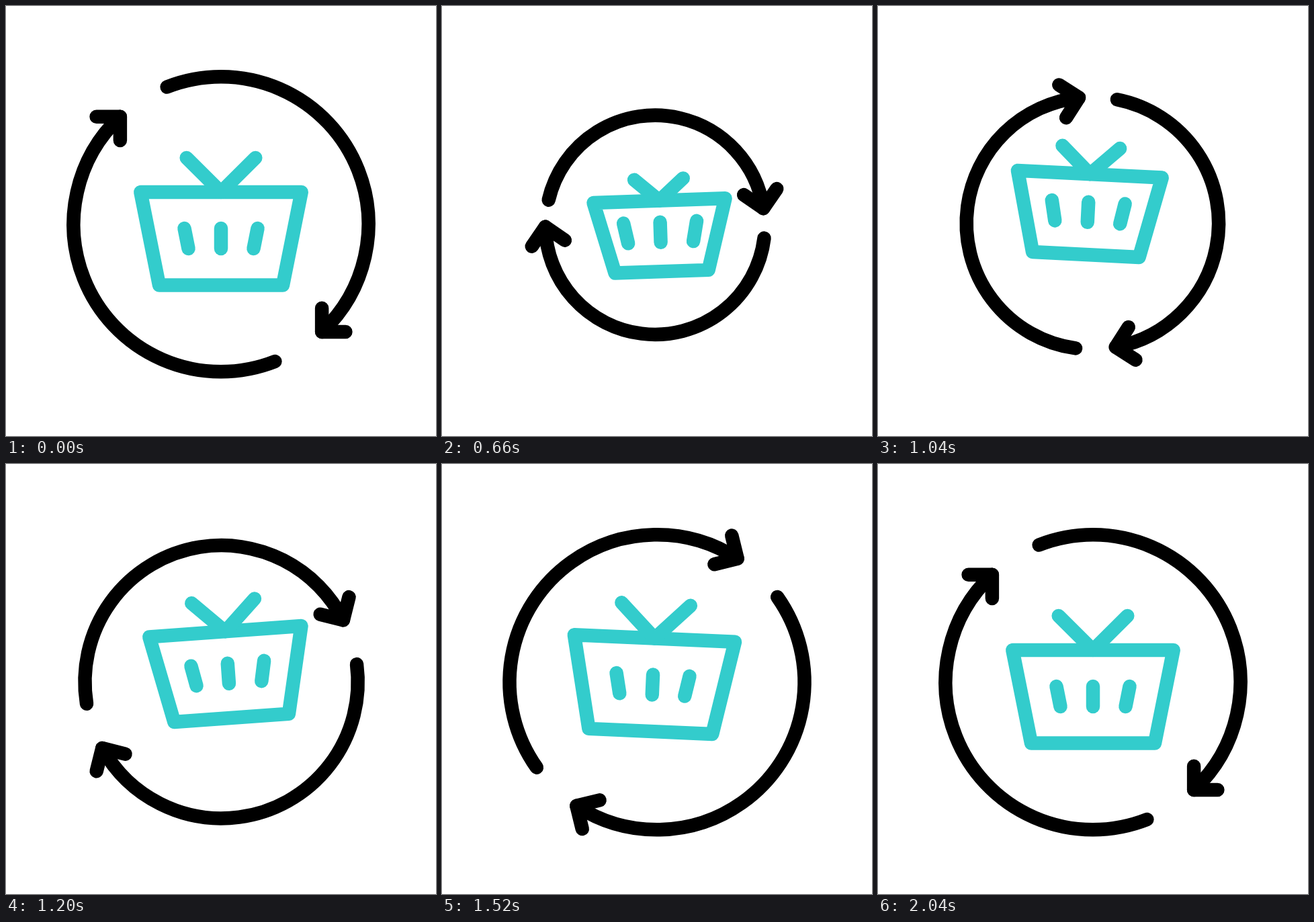
These frames come from a looping animation (640x640 px, 2.82 s). An HTML page with a canvas:

```html
<!DOCTYPE html>
<html lang="en">
<head>
<meta charset="utf-8">
<title>Basket cycle</title>
<style>
  html, body { margin: 0; width: 100%; height: 100%; overflow: hidden; background: #fff; }
  canvas { display: block; width: 100vmin; height: 100vmin; margin: 0 auto; }
</style>
</head>
<body>
<canvas id="stage"></canvas>
<script>
const LOOP = 2820, STEP = 20, SIZE = 640;
const RAD = Math.PI / 180;
const canvas = document.getElementById('stage');
const ctx = canvas.getContext('2d');
const scale = window.devicePixelRatio || 1;
canvas.width = canvas.height = SIZE * scale;

const mix = (a, b, k) => a + (b - a) * k;
const span = (t, from, to) => Math.min(1, Math.max(0, (t - from) / (to - from)));
const sineInOut = u => (1 - Math.cos(Math.PI * u)) / 2;
const sineOut = u => Math.sin(u * Math.PI / 2);

// Cubic ease with flat ends; x1 and x2 set how long each end lingers.
function ease(u, x1, x2) {
  let lo = 0, hi = 1;
  for (let i = 0; i < 24; i++) {
    const s = (lo + hi) / 2, r = 1 - s;
    if (3 * r * r * s * x1 + 3 * r * s * s * x2 + s * s * s < u) lo = s;
    else hi = s;
  }
  return lo * lo * (3 - 2 * lo);
}

// 0 = full size, 1 = squeezed
function squeeze(t) {
  return t < 620
    ? ease(span(t, 200, 570), 0.33, 0.3)
    : 1 - sineInOut(span(t, 626, 1525));
}

// Quick wind-up backwards, then one long turn forwards.
function turn(t) {
  const back = -55.8;
  return t < 620
    ? back * (1 - Math.pow(1 - span(t, 200, 570), 7))
    : mix(back, 360, sineInOut(span(t, 635, 1962)));
}

function lift(t) {
  return 40.6 * (t < 895
    ? sineOut(span(t, 620, 895))
    : 1 - sineInOut(span(t, 895, 2040)));
}

const swing = t => -4.2 * Math.sin(6 * Math.PI * span(t, 624, 2040));

function line(...pts) {
  ctx.beginPath();
  for (let i = 0; i < pts.length; i += 2) ctx.lineTo(pts[i], pts[i + 1]);
  ctx.stroke();
}

function arrow(r, tail, tip, side) {
  const a = tip * RAD, x = r * Math.cos(a), y = r * Math.sin(a), wing = 35.3 * side;
  ctx.beginPath();
  ctx.arc(0, 0, r, tail * RAD, a);
  ctx.stroke();
  line(x, y - wing, x, y, x + wing, y);
}

function drawRing(k, angle) {
  const r = mix(219.5, 162.6, k);
  ctx.save();
  ctx.translate(320, 324.8);
  ctx.rotate(angle * RAD);
  ctx.translate(-2.1 * k, -1.9 * k);
  ctx.strokeStyle = '#000';
  arrow(r, -111.5, 46.85, 1);
  arrow(r + 0.7 * k, 68.5 - 6 * k, 226.85 + 7.5 * k, -1);
  ctx.restore();
}

function drawBasket(k, rise, angle) {
  const top = mix(277, 299, k), base = mix(415.5, 404.5, k);
  const wide = mix(119.7, 98, k), narrow = mix(92, 69.5, k);
  const grip = mix(51.3, 36.3, k), gripY = top - mix(51, 32, k);
  ctx.save();
  ctx.translate(320, 195 - rise);
  ctx.rotate(angle * RAD);
  ctx.translate(0, -195);
  ctx.strokeStyle = '#33cccc';
  ctx.beginPath();
  ctx.moveTo(-wide, top);
  ctx.lineTo(wide, top);
  ctx.lineTo(narrow, base);
  ctx.lineTo(-narrow, base);
  ctx.closePath();
  ctx.stroke();
  line(-grip, gripY, 0, top, grip, gripY);
  for (const s of [-1, 0, 1]) line(s * 54.5, 331, s * 48.5, 361);
  ctx.restore();
}

function draw(t) {
  const k = squeeze(t);
  ctx.setTransform(scale, 0, 0, scale, 0, 0);
  ctx.fillStyle = '#fff';
  ctx.fillRect(0, 0, SIZE, SIZE);
  ctx.lineWidth = 20.5;
  ctx.lineCap = ctx.lineJoin = 'round';
  drawRing(k, turn(t));
  drawBasket(k, lift(t), swing(t));
}

const start = performance.now();
function tick() {
  const t = (performance.now() - start) % LOOP;
  draw(Math.floor(t / STEP) * STEP);
  requestAnimationFrame(tick);
}
tick();
</script>
</body>
</html>
```
